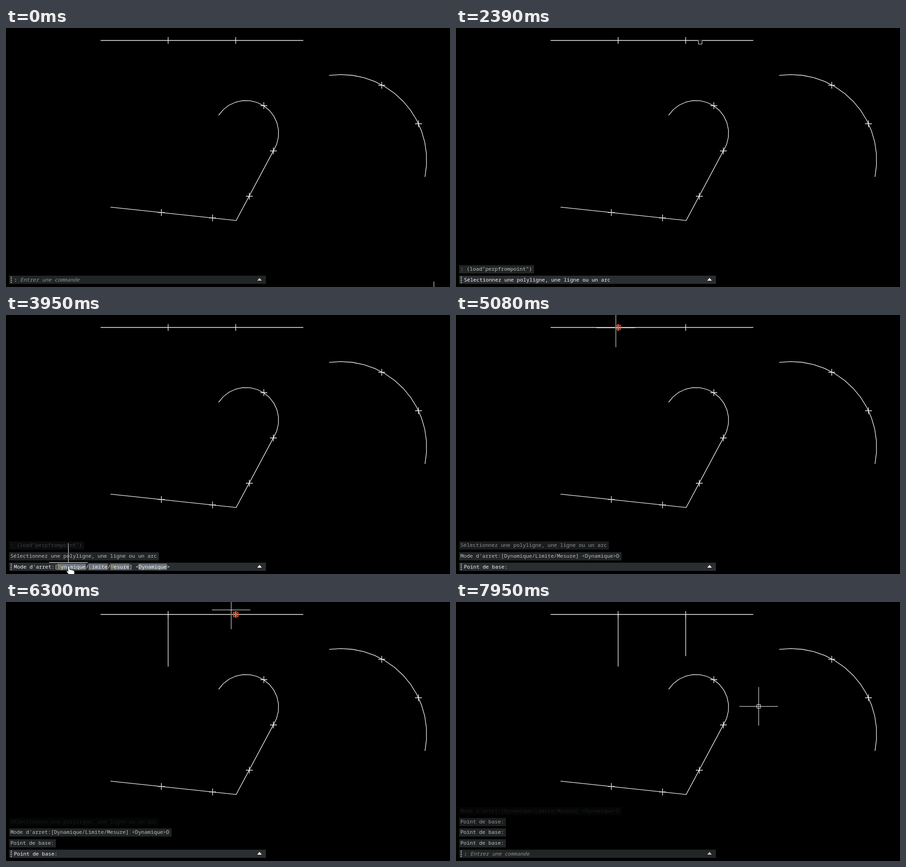
Recreate the animation shown at these times as an HTML page. Size 979 px wide and 572 px high, loop 8000 ms.

```html
<!DOCTYPE html>
<html lang="fr">
<head>
<meta charset="utf-8">
<title>Perpendiculaires</title>
<style>
html, body { margin: 0; width: 100%; height: 100%; overflow: hidden; background: #000; }
svg { display: block; width: 979px; height: 572px; background: #000; }
text { font: 11.46px "Noto Sans Mono", "DejaVu Sans Mono", monospace; }
.hint { font-style: italic; fill: #8e9090; }
.line { fill: none; stroke: #fff; stroke-width: 1; }
.soft { stroke-width: 1.3; }
.cursor { mix-blend-mode: difference; }
.snap { fill: none; stroke: #e8441c; stroke-width: 1.6; }
.past rect { fill: #222526; }
.past text { fill: #bcbebf; }
.key { fill: #68717a; }
.hot { fill: #d99a2b; }
</style>
</head>
<body>
<svg viewBox="0 0 979 572">
  <rect width="979" height="572"/>
  <g transform="translate(.5 .5)">
    <path id="drawing" class="line soft"/>
    <path id="perps" class="line soft"/>
    <path id="snap" class="snap" d="M-6 0a6 6 0 1 0 12 0a6 6 0 1 0 -12 0M-6 -6L6 6M-6 6L6 -6"/>
  </g>
  <g id="history"></g>
  <g class="cursor" transform="translate(.5 .5)">
    <g id="cursor">
      <path id="cross" class="line" d="M-42.5 0h85M0 -42.5v85"/>
      <path id="pick" class="line" d="M-4 -4h8v8h-8z"/>
    </g>
  </g>
  <rect id="bar" x="7" y="547" width="566" height="18"/>
  <path d="M11.5 549v15" stroke="#d8d8d8" stroke-width="2" stroke-dasharray="2 2"/>
  <path id="arrow" d="M554 558l5 -6 5 6z"/>
  <g id="prompts" fill="#f4f4f4"></g>
  <g id="hand">
    <path transform="scale(1.25)" fill="#fff" stroke="#000" stroke-width=".8"
      d="M-1.5 1.5q1.5 -2.5 3 0v5l2.5 .3 2.5 .7 2.5 1q1.2 .8 1 2v3l-1.5 3v1h-8v-1.5l-4 -5q-1.5 -2.5 1 -2.2l1 1z"/>
  </g>
</svg>
<script>
const LOOP = 8000, CHAR = 6.875;
const $ = id => document.getElementById(id);
const show = (el, on) => el.setAttribute('display', on ? 'inline' : 'none');
const move = (el, x, y) => el.setAttribute('transform', `translate(${x} ${y})`);
const mix = (a, b, k) => a + (b - a) * k;
const clamp = v => Math.min(1, Math.max(0, v));
const smooth = u => u * u * (3 - 2 * u);

function add(parent, name, attrs, text) {
  const el = document.createElementNS('http://www.w3.org/2000/svg', name);
  for (const k in attrs) el.setAttribute(k, attrs[k]);
  if (text) el.textContent = text;
  return parent.appendChild(el);
}

// Faceted arc, angles in degrees
function arc(cx, cy, r, from, to, n = 14) {
  return Array.from({ length: n + 1 }, (_, i) => {
    const a = mix(from, to, i / n) * Math.PI / 180;
    return [cx + r * Math.cos(a), cy + r * Math.sin(a)];
  });
}

// Points that cut a path into n equal lengths
function divide(pts, n) {
  const len = i => Math.hypot(pts[i + 1][0] - pts[i][0], pts[i + 1][1] - pts[i][1]);
  let total = 0;
  for (let i = 0; i < pts.length - 1; i++) total += len(i);
  return Array.from({ length: n - 1 }, (_, k) => {
    let rest = total * (k + 1) / n, i = 0;
    while (rest > len(i)) rest -= len(i++);
    return [0, 1].map(a => Math.round(mix(pts[i][a], pts[i + 1][a], rest / len(i))));
  });
}

const poly = pts => 'M' + pts.map(p => p.map(v => v.toFixed(2)).join(' ')).join('L');
const marker = ([x, y]) => `M${x - 7.5} ${y}h15M${x} ${y - 7.5}v15`;

const shapes = [
  [[[208, 27], [655, 27]], 3],
  [arc(738, 291.3, 189, -97.9, 11.3), 3],
  [[[230, 395.2], [507, 424.6], ...arc(528.6, 231.6, 72, 32.8, -146.9)], 6]
];
$('drawing').setAttribute('d', shapes.map(([pts, n]) =>
  poly(pts) + divide(pts, n).map(marker).join('')).join(''));

// Pointer moves: start, end, x, y reached
const moves = [
  [0, 1, 943, 602], [1150, 1950, 540, 139], [1980, 2450, 538, 26],
  [2800, 3700, 137, 546], [4210, 5060, 352, 28], [5290, 5680, 430, 142],
  [5680, 6070, 618, 97], [6070, 6300, 496, 17], [6450, 7190, 471, 119],
  [7280, 7700, 665, 225], [7700, 7940, 667, 230]
];

function pointer(t) {
  let [, , x, y] = moves[0];
  for (const [from, to, mx, my] of moves) {
    const k = smooth(clamp((t - from) / (to - from)));
    x = mix(x, mx, k);
    y = mix(y, my, k);
  }
  return [Math.round(x), Math.round(y)];
}

const LOAD = ': (load"perpfrompoint")';
const SELECT = 'Sélectionnez une polyligne, une ligne ou un arc';
const MODE = "Mode d'arret:[Dynamique/Limite/Mesure] <Dynamique>";
const BASE = 'Point de base:';

const past = [
  [LOAD, 760], [SELECT, 2730], [MODE + 'D', 4390],
  [BASE, 5660], [BASE, 7260], [BASE, 7730]
].map(([text, at]) => {
  const el = add($('history'), 'g', { class: 'past' });
  add(el, 'rect', { x: 7, width: Math.round(text.length * CHAR + 7), height: 18 });
  add(el, 'text', { x: 9.7, y: 12 }, text);
  return { el, at };
});

const prompt = text => {
  const g = add($('prompts'), 'g', {});
  if (text) add(g, 'text', { x: 17.5, y: 560 }, text);
  return g;
};

function idlePrompt() {
  const g = prompt(':');
  add(g, 'text', { class: 'hint', x: 31.3, y: 560 }, 'Entrer une commande');
  return g;
}

// Option words get a backing, those in the list also a coloured initial
function modePrompt(tail) {
  const g = prompt('');
  const words = [...MODE.matchAll(/Dynamique|Limite|Mesure/g)];
  for (const w of words)
    add(g, 'rect', { class: 'key', x: 17 + w.index * CHAR, y: 549, width: w[0].length * CHAR + 1, height: 14 });
  const hot = words.slice(0, 3).map(w => w.index);
  const line = add(g, 'text', { x: 17.5, y: 560 });
  [...MODE + tail].forEach((c, i) => {
    if (hot.includes(i)) add(line, 'tspan', { class: 'hot' }, c);
    else line.append(c);
  });
  return g;
}

const idle = idlePrompt();
const prompts = [
  [0, idle], [650, prompt(LOAD)], [760, prompt(SELECT)], [2730, modePrompt('')],
  [4150, modePrompt('D')], [4300, prompt(BASE)], [7690, idle]
];

// Each perpendicular follows the pointer until it is fixed
const perps = [
  { x: 357, near: 4960, from: 5290, to: 5660, end: 142 },
  { x: 506, near: 6220, from: 6450, to: 7260, end: 119 }
];

function draw(t) {
  const [x, y] = pointer(t);
  const picking = t >= 1150 && t < 2730;
  move($('cursor'), x, y);
  show($('cross'), !picking);
  show($('pick'), picking || t < 650 || t >= 7690);

  $('perps').setAttribute('d', perps.filter(p => t >= p.from)
    .map(p => `M${p.x} 27V${t < p.to ? y : p.end}`).join(''));

  const target = perps.find(p => t >= p.near && t < p.from);
  show($('snap'), target);
  if (target) move($('snap'), target.x, 27);

  past.forEach(({ el, at }, i) => {
    const row = past.filter((p, k) => k > i && t >= p.at).length;
    show(el, t >= at);
    el.setAttribute('opacity', clamp((3830 - t + at) / 1930));
    move(el, 0, Math.round(524 - row * 23.6));
  });

  const active = prompts.filter(p => t >= p[0]).pop()[1];
  for (const [, el] of prompts) show(el, el === active);
  $('bar').setAttribute('fill', active === idle ? '#222526' : '#2b2e31');
  $('arrow').setAttribute('fill', active === idle ? '#c4c4c4' : '#fff');

  show($('hand'), t >= 3690 && t < 4230);
  move($('hand'), 138.5, Math.round(mix(549, 554, clamp((t - 3690) / 160))));
}

const start = performance.now();
function tick(now) {
  draw(Math.max(0, now - start) % LOOP);
  requestAnimationFrame(tick);
}
draw(0);
requestAnimationFrame(tick);
</script>
</body>
</html>
```
